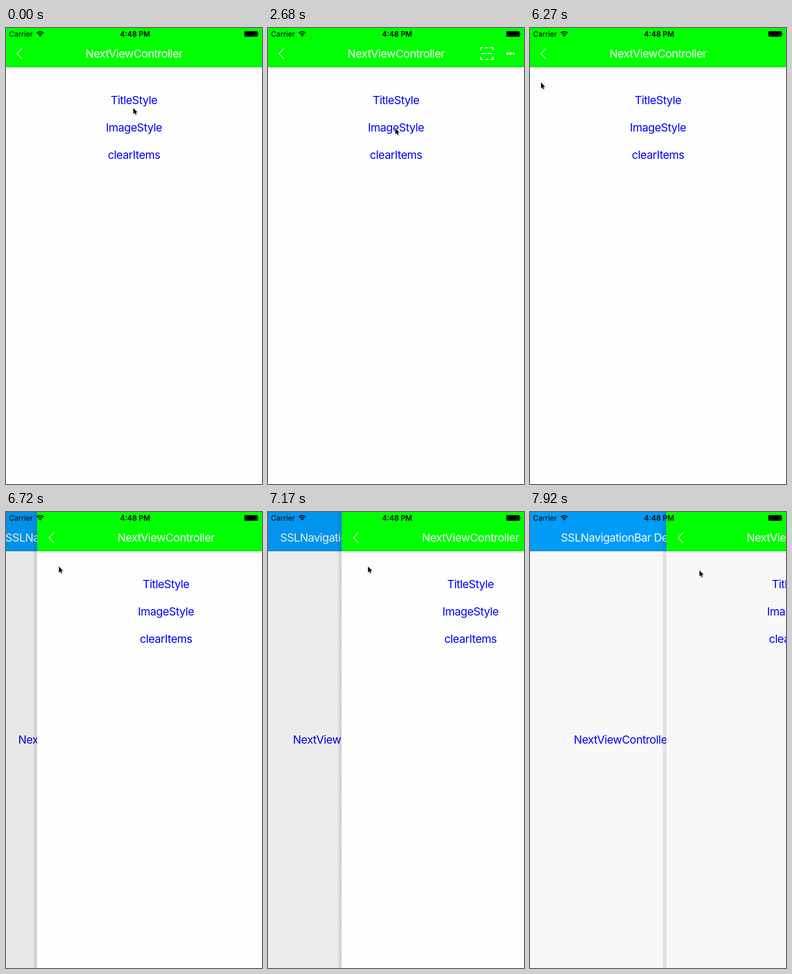
These frames come from a looping animation (560x1000 px, 8 s). An HTML page:

```html
<!DOCTYPE html>
<html lang="en">
<head>
<meta charset="utf-8">
<title>Navigation bar demo</title>
<style>
  html, body { margin: 0; width: 100%; height: 100%; overflow: hidden; background: #fefefe; }
  svg { display: block; }
  text { font: 16px Inter, sans-serif; }
  .title, .link { font-size: 24.4px; letter-spacing: -.6px; text-anchor: middle; }
  .title { fill: #fff; }
  .link { fill: #00f; }
  .clock { font-weight: 600; text-anchor: middle; }
  .item { font: 18px "Noto Sans CJK SC", "Noto Sans CJK", sans-serif; fill: #fff; text-anchor: middle; }
  .line { fill: none; stroke: #fff; }
</style>
</head>
<body>
<svg width="560" height="1000" viewBox="0 0 560 1000">
  <defs>
    <linearGradient id="shade">
      <stop offset="0" stop-opacity=".06"/>
      <stop offset="1" stop-opacity=".12"/>
    </linearGradient>
    <path id="arrow" d="M0 0V13L3 10.4L4.8 14.6L7 13.7L5.2 9.5H9.2Z" stroke-linejoin="round"/>
    <rect id="hairline" x="-2" y="85" width="562" height="1" opacity=".25"/>
  </defs>

  <g id="home">
    <rect width="560" height="1000" fill="#fff"/>
    <rect width="560" height="86" fill="#00a0ff"/>
    <use href="#hairline"/>
    <g id="homeText">
      <text class="title" x="112" y="65">SSLNavigationBar Demo</text>
      <text class="link" x="112" y="508">NextViewController</text>
    </g>
    <rect id="dim" width="560" height="1000"/>
  </g>

  <g id="next">
    <rect x="-10" width="8" height="1000" fill="url(#shade)"/>
    <rect id="page" x="-2" width="562" height="1000"/>
    <rect x="-2" width="562" height="86" fill="#0f0"/>
    <use href="#hairline"/>
    <path class="line" stroke-width="1.4" d="M35 44.5L24 56.2L35 68"/>
    <text class="title" x="280" y="65">NextViewController</text>
    <text class="link" x="280" y="167">TitleStyle</text>
    <text class="link" x="280" y="227">ImageStyle</text>
    <text class="link" x="280" y="287">clearItems</text>
    <g id="titles">
      <text class="item" x="478.5" y="63">扫描</text>
      <text class="item" x="530.5" y="63">更多</text>
    </g>
    <g id="icons">
      <path class="line" stroke-width="2" d="M465 49V43H471M475 43H482M486 43H492V49
        M465 63V69H471M475 69H482M486 69H492V63M466.5 56H490"/>
      <path class="line" stroke-width="5.4" stroke-linecap="round" d="M524 56.3h0M530.5 56.3h0M537 56.3h0"/>
    </g>
  </g>

  <g id="status">
    <text x="6.5" y="19">Carrier</text>
    <path fill="none" stroke="#000" stroke-width="2" d="M67.4 11A10.6 10.6 0 0 1 82.4 11M70.2 14A6.6 6.6 0 0 1 79.6 14"/>
    <path d="M74.9 18.8L72.1 16A4 4 0 0 1 77.7 16Z"/>
    <text class="clock" x="282.5" y="19">4:48 PM</text>
    <rect x="521" y="6.5" width="30" height="13" rx="2" opacity=".6"/>
    <rect x="522" y="7.5" width="28" height="11" rx="1"/>
    <path d="M552 11Q554 13.2 552 15.5Z"/>
  </g>

  <g id="cursor">
    <use href="#arrow" x=".6" y="1.3" fill="none" stroke="#000" stroke-width="3" opacity=".15"/>
    <use href="#arrow" stroke="#fff" stroke-width="2" paint-order="stroke"/>
  </g>
</svg>
<script>
const LOOP = 8000, STEP = 149.4;
const el = id => document.getElementById(id);
const move = (id, x, y = 0) => el(id).setAttribute('transform', `translate(${x} ${y})`);
const show = (id, on) => el(id).setAttribute('visibility', on ? 'visible' : 'hidden');

function draw(t) {
  // The screen refreshes in steps
  const step = Math.floor((t + 12) / STEP);
  const span = (from, to) => Math.min(1, Math.max(0, (step - from) / (to - from)));

  // The swipe starts quickly, hesitates, then goes on
  const shift = 70 * span(43, 45) + 93 * span(45, 48) + 32 * span(48, 50) + 105 * span(50, 53);

  // The cursor visits the three links and the back arrow, then leads the swipe
  const x = 278.5 - 2.5 * span(24, 28) - 254 * span(33, 39.75) + 2 * span(40, 42)
    + (shift && 14 + 1.109 * shift);
  const y = 175.5 - 12 * span(0, 3) + 56.5 * span(9, 14) + 60 * span(24, 28)
    - 219 * span(33, 39) ** 1.27 + 58.5 * span(39, 42) + 8.5 * span(48, 53);

  const late = step >= 50;
  move('cursor', x, y);
  move('next', shift);
  move('homeText', 0.3 * shift);
  el('dim').setAttribute('opacity', late ? 0.027 : 0.102 - 0.00017 * shift);
  el('page').setAttribute('fill', late ? '#f8f8f8' : '#fefefe');
  show('titles', step >= 8 && step < 18);
  show('icons', step >= 18 && step < 31);
}

const start = performance.now();
function loop() {
  draw((performance.now() - start) % LOOP);
  requestAnimationFrame(loop);
}
loop();
</script>
</body>
</html>
```
